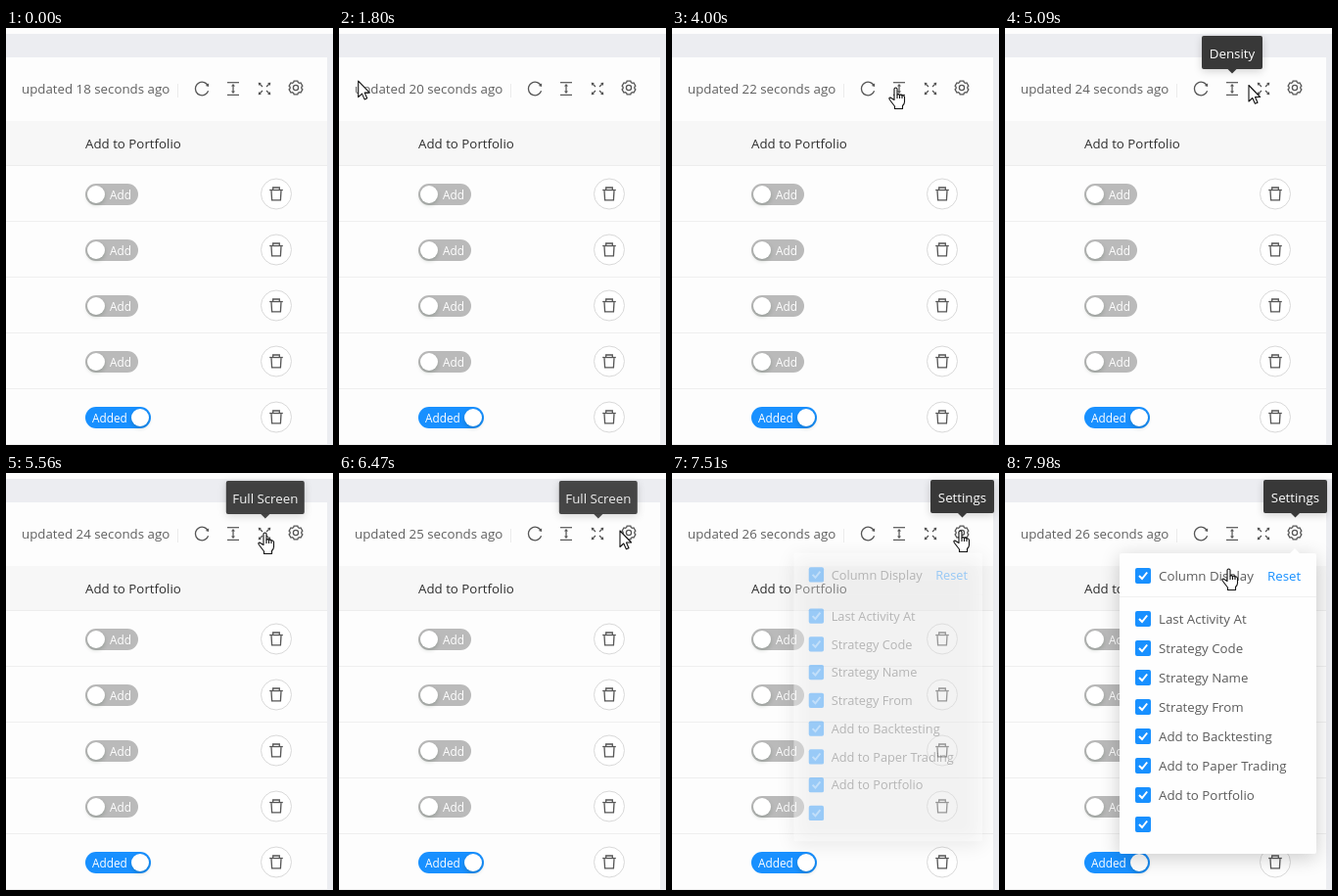
Recreate the animation shown at these times as an HTML page with a canvas. Size 334 by 426 pixels, loop 8 s.

```html
<!DOCTYPE html>
<html lang="en">
<head>
<meta charset="utf-8">
<title>Table toolbar</title>
<style>
  html, body { margin: 0; width: 100%; height: 100%; overflow: hidden; background: #fdfdfd; }
  canvas { display: block; width: 334px; height: 426px; }
</style>
</head>
<body>
<canvas id="stage"></canvas>
<script>
const W = 334, H = 426, LOOP = 8000;
const INK = '#565656', BLUE = '#1890ff', CARD = '#fdfdfd';
const FONT = '"Open Sans", "Noto Sans", sans-serif';

const canvas = document.getElementById('stage');
const ctx = canvas.getContext('2d');
const dpr = window.devicePixelRatio || 1;
canvas.width = W * dpr;
canvas.height = H * dpr;

const clamp = v => Math.max(0, Math.min(1, v));
const ramp = (t, from, to) => clamp((t - from) / (to - from));
const easeOut = p => 1 - (1 - p) ** 3;

function rect(x, y, w, h, color) {
  ctx.fillStyle = color;
  ctx.fillRect(x, y, w, h);
}

function roundRect(x, y, w, h, r, color) {
  ctx.beginPath();
  ctx.roundRect(x, y, w, h, r);
  ctx.fillStyle = color;
  ctx.fill();
}

function text(str, x, y, color, size = 13.3, align = 'left') {
  ctx.font = `${size}px ${FONT}`;
  ctx.textAlign = align;
  ctx.fillStyle = color;
  ctx.fillText(str, x, y);
}

function circle(x, y, r) {
  ctx.beginPath();
  ctx.arc(x, y, r, 0, Math.PI * 2);
}

function poly(...pts) {
  ctx.beginPath();
  pts.forEach(([x, y]) => ctx.lineTo(x, y));
  ctx.closePath();
}

function shadow(color, blur, dy) {
  ctx.shadowColor = color;
  ctx.shadowBlur = blur * dpr;
  ctx.shadowOffsetY = dy * dpr;
}

function at(x, y, draw) {
  ctx.save();
  ctx.translate(x, y);
  draw();
  ctx.restore();
}

// Fades and scales a popup around its anchor point.
function popup(x, y, shown, draw) {
  if (shown <= 0) return;
  const s = 0.8 + 0.2 * easeOut(shown);
  at(x, y, () => {
    ctx.globalAlpha = shown;
    ctx.scale(s, s);
    ctx.translate(-x, -y);
    draw();
  });
}

// Icons are drawn in a 16px box.
function icon(x, y, draw) {
  at(x, y, () => {
    ctx.strokeStyle = ctx.fillStyle = INK;
    ctx.lineWidth = 1.3;
    draw();
  });
}

function reloadIcon() {
  ctx.beginPath();
  ctx.arc(8.2, 8, 6.8, 0.35, -0.6);
  ctx.stroke();
  poly([15.1, 2.5], [15.1, 6], [11.8, 5.1]);
  ctx.fill();
}

function heightIcon() {
  ctx.fillRect(2, 1.1, 12, 1.2);
  ctx.fillRect(2, 13.8, 12, 1.2);
  ctx.fillRect(7.4, 5, 1.25, 6);
  poly([8, 3], [6, 5.6], [10, 5.6]);
  ctx.fill();
  poly([8, 13], [6, 10.4], [10, 10.4]);
  ctx.fill();
}

function expandIcon() {
  for (let i = 0; i < 4; i++) {
    at(8, 8, () => {
      ctx.rotate(i * Math.PI / 2);
      poly([-6.3, -6.3], [-3.1, -5.9], [-5.9, -3.1]);
      ctx.fill();
      ctx.beginPath();
      ctx.moveTo(-5, -5);
      ctx.lineTo(-2, -2);
      ctx.stroke();
    });
  }
}

function gearIcon() {
  const pts = [];
  for (let k = 0; k < 6; k++) {
    for (const [deg, r] of [[-15, 7.1], [15, 7.1], [23, 5.9], [37, 5.9]]) {
      const a = (30 + 60 * k + deg) * Math.PI / 180;
      pts.push([8 + r * Math.cos(a), 8 + r * Math.sin(a)]);
    }
  }
  poly(...pts);
  ctx.stroke();
  circle(8, 8, 2.6);
  ctx.stroke();
}

function trashIcon() {
  ctx.fillRect(1.2, 3.4, 13.6, 1.3);
  ctx.beginPath();
  ctx.moveTo(4.7, 3.5);
  ctx.lineTo(4.7, 1.5);
  ctx.lineTo(11.3, 1.5);
  ctx.lineTo(11.3, 3.5);
  ctx.moveTo(3, 4.6);
  ctx.lineTo(3.6, 14.4);
  ctx.lineTo(12.4, 14.4);
  ctx.lineTo(13, 4.6);
  ctx.stroke();
}

function toggle(y, on) {
  roundRect(81, y - 11, on ? 67 : 54, 22, 11, on ? BLUE : '#bababa');
  text(on ? 'Added' : 'Add', on ? 88 : 106, y + 4.6, '#fff', 11.8);
  ctx.save();
  shadow('rgba(0,35,11,.2)', 4, 2);
  circle(on ? 137 : 92, y, 9);
  ctx.fillStyle = '#fff';
  ctx.fill();
  ctx.restore();
}

function trashButton(y) {
  circle(276, y, 15.5);
  ctx.fillStyle = '#fff';
  ctx.fill();
  ctx.strokeStyle = '#d9d9d9';
  ctx.lineWidth = 1;
  ctx.stroke();
  icon(268, y - 8, trashIcon);
}

function page(t) {
  rect(0, 0, W, H, '#ecedf1');
  rect(0, 0, W, 6, '#fdfdfd');
  rect(0, 30, 328, H - 30, CARD);

  const seconds = 18 + Math.floor((t + 960) / 1000);
  text(`updated ${seconds} seconds ago`, 16, 67, '#606060');
  rect(175, 57, 1, 14, '#ececec');
  icon(192, 54, reloadIcon);
  icon(224, 54, heightIcon);
  icon(256, 54, expandIcon);
  icon(288, 53, gearIcon);

  rect(0, 95, 328, 45, '#f7f7f7');
  rect(0, 140, 328, 1, '#ededed');
  text('Add to Portfolio', 81, 123, '#2e2e2e');
  for (let i = 0; i < 5; i++) {
    const y = 170 + 57 * i;
    toggle(y, i === 4);
    trashButton(y - 0.5);
    rect(0, y + 27, 328, 1, '#efefef');
  }
}

function checkbox(y) {
  roundRect(133, y - 8, 16, 16, 2, BLUE);
  ctx.beginPath();
  ctx.moveTo(137, y);
  ctx.lineTo(140, y + 3);
  ctx.lineTo(145.2, y - 3.5);
  ctx.strokeStyle = '#fff';
  ctx.lineWidth = 2;
  ctx.stroke();
}

const COLUMNS = ['Last Activity At', 'Strategy Code', 'Strategy Name', 'Strategy From',
  'Add to Backtesting', 'Add to Paper Trading', 'Add to Portfolio', ''];

function panel() {
  ctx.save();
  shadow('rgba(0,0,0,.2)', 20, 4);
  roundRect(117, 82, 201, 307, 2, '#fefefe');
  ctx.restore();
  poly([296, 77], [301, 82], [291, 82]);
  ctx.fillStyle = '#fefefe';
  ctx.fill();
  checkbox(105);
  text('Column Display', 157, 110, '#5c5c5c');
  text('Reset', 268, 110, BLUE);
  rect(117, 126, 201, 1, '#f0f0f0');
  COLUMNS.forEach((name, i) => {
    const y = 149 + 30 * i;
    checkbox(y);
    text(name, 157, y + 5, '#5c5c5c');
  });
}

// label, centre x, width, top, fade in start/end, fade out start/end
const TIPS = [
  ['Refresh', 200, 64, 8, 3270, 3420, 3700, 3820],
  ['Density', 232, 62, 8, 4240, 4400, 5110, 5230],
  ['Full Screen', 264.8, 80, 8, 5400, 5570, 6460, 6570],
  ['Settings', 296.5, 65, 7, 6960, 7130, LOOP, LOOP + 1]
];

function tooltip([label, x, w, top, in0, in1, out0, out1], t) {
  const shown = ramp(t, in0, in1) * (1 - ramp(t, out0, out1));
  popup(x, top + 38, shown, () => {
    ctx.save();
    shadow('rgba(0,0,0,.18)', 8, 2);
    roundRect(x - w / 2, top, w, 34, 2, '#383838');
    ctx.restore();
    poly([x - 5, top + 33.5], [x + 5, top + 33.5], [x, top + 38.5]);
    ctx.fillStyle = '#383838';
    ctx.fill();
    text(label, x, top + 23, '#fff', 13.3, 'center');
  });
}

const ARROW = new Path2D('M0 0V16.5L3.8 13 6.4 18.8 9 17.7 6.5 12H11.6Z');
const HAND = new Path2D('M-1.5 1.5q1.5-2 3 0v6q1.5-1 2.5.5 1.5-1 2.5.5 2-.5 2.5 1.5v5q0 2-2 4v3h-8v-2.5' +
  'l-5-6.5q-1.5-2.5.5-2.5l4 2.5z');
const KNUCKLES = new Path2D('M1.5 7.5v4M4 8v3.5M6.5 8.5v3');

// time, x, y of the pointer
const PATH = [
  [1640, -14, 52], [2440, 152, 60], [2840, 187, 65], [3040, 199, 62], [3640, 199, 62],
  [4000, 228, 60], [4930, 228, 60], [5090, 248.5, 58], [5260, 264, 60], [6330, 264, 60],
  [6470, 286.5, 58.5], [6640, 294, 59], [7200, 294, 58], [7870, 294, 58], [7970, 228, 97]
];

function pointerAt(t) {
  const i = PATH.findIndex(k => k[0] > t);
  if (i < 0) return PATH[PATH.length - 1].slice(1);
  if (i === 0) return null;
  const [t0, x0, y0] = PATH[i - 1], [t1, x1, y1] = PATH[i];
  const p = ramp(t, t0, t1);
  return [x0 + (x1 - x0) * p, y0 + (y1 - y0) * p];
}

function pointer(t) {
  const pos = pointerAt(t);
  if (!pos) return;
  const [x, y] = pos;
  const onIcon = y < 75 && [200, 232, 264, 296].some(c => Math.abs(x - c) <= 8);
  const onLabel = y > 95 && x < 253;
  at(x + 0.5, y + 0.5, () => {
    ctx.lineJoin = 'round';
    ctx.lineWidth = 1.1;
    ctx.fillStyle = '#fff';
    ctx.strokeStyle = '#111';
    const shape = onIcon || onLabel ? HAND : ARROW;
    ctx.fill(shape);
    ctx.stroke(shape);
    if (shape === HAND) ctx.stroke(KNUCKLES);
  });
}

function frame(now) {
  const t = now % LOOP;
  ctx.setTransform(dpr, 0, 0, dpr, 0, 0);
  page(t);
  popup(296, 78, ramp(t, 7420, 7640), panel);
  TIPS.forEach(tip => tooltip(tip, t));
  pointer(t);
}

let start;
function tick(now) {
  start ??= now;
  frame(now - start);
  requestAnimationFrame(tick);
}
frame(0);
requestAnimationFrame(tick);
</script>
</body>
</html>
```
